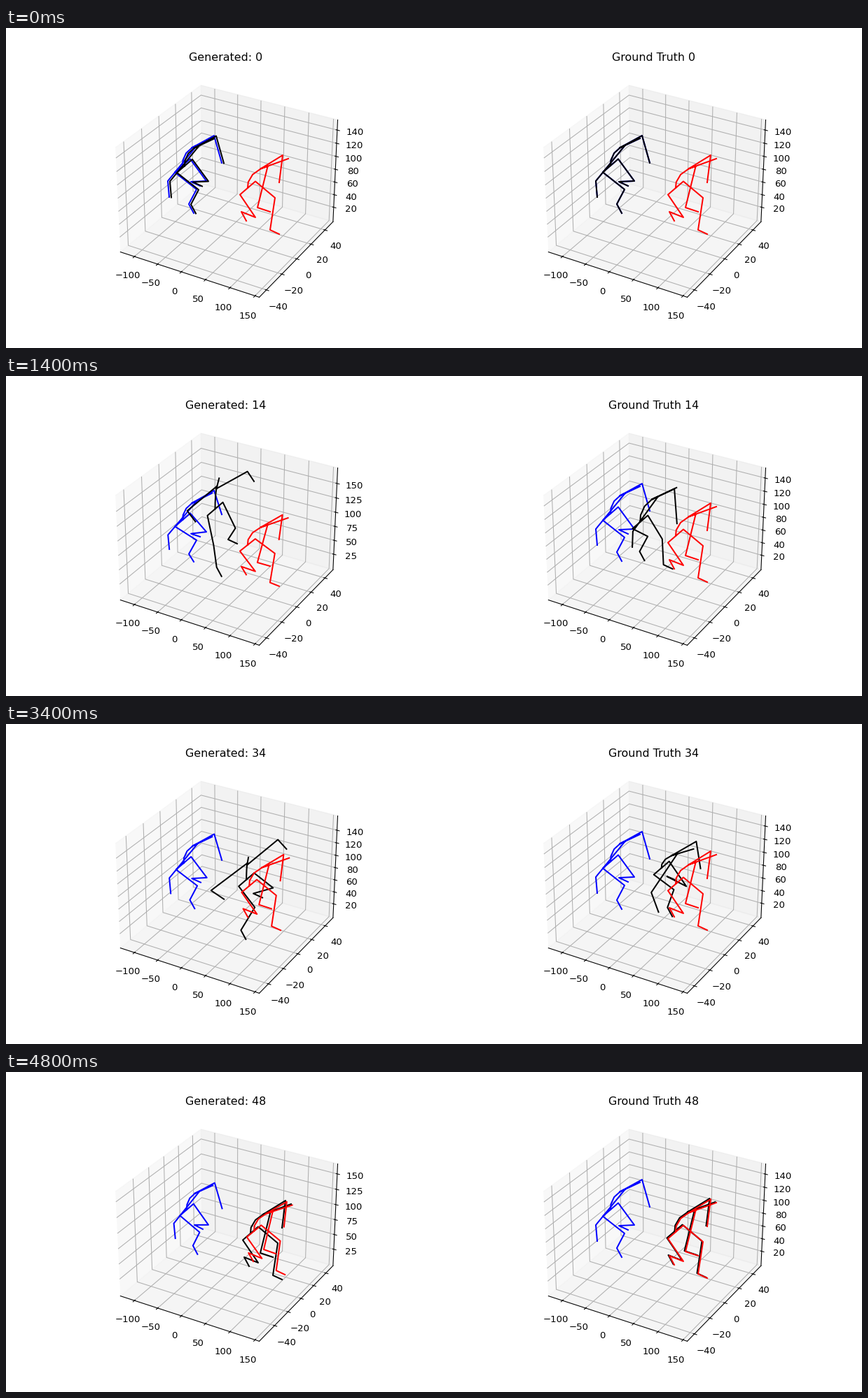
Recreate the animation shown at these times as a matplotlib script. Size 1222 px wide and 458 px high, loop 4.9 s.

```python
import numpy as np
import matplotlib.pyplot as plt
from matplotlib.animation import FuncAnimation
from matplotlib.lines import Line2D
from matplotlib.transforms import Affine2D

W, H, DPI = 1222, 458, 95.46875
FRAMES, STEP_MS = 49, 100
PANEL = W / 2

fig = plt.figure(figsize=(12.8, 4.8), dpi=DPI)
to_fig = (Affine2D().scale(1, -1).translate(0, H).scale(1 / W, 1 / (4.8 * DPI))
          + fig.transFigure)

# Camera of the 3D axes, in pixels of one panel
BOX = np.array([4, 4, 3]) / np.sqrt(41) * 1.8294640721620434 * 25 / 24
RIGHT = np.array([np.sqrt(0.75), 0.5, 0])
UP = np.array([-0.25, np.sqrt(3) / 4, np.sqrt(0.75)])
TOWARD = np.array([np.sqrt(3) / 4, -0.75, 0.5])
SCALE = 0.77 * 4.8 * DPI / 0.185
CX = PANEL * 0.5125 + 0.0025 * SCALE
CY = H - 0.495 * 4.8 * DPI - 0.0025 * SCALE

XLIM, ZMIN = (-130.5, 158.4), -3.4
REST = (-49, 52, 155.2)  # y range and top of z


def box_limits(y0, y1, z1):
    low = np.array([XLIM[0], y0, ZMIN])
    return low, np.array([XLIM[1], y1, z1]) - low


def project(points, limits):
    low, size = box_limits(*limits)
    p = ((points - low) / size - 0.5) * BOX
    depth = 10 - p @ TOWARD
    return np.column_stack([CX + SCALE * (p @ RIGHT) / depth,
                            CY - SCALE * (p @ UP) / depth])


def unproject(pixels, plane):
    """World positions of pixels, with y a linear function of the pixel."""
    low, size = box_limits(*REST)
    y = pixels @ plane[:2] + plane[2]
    box_y = ((y - low[1]) / size[1] - 0.5) * BOX[1]
    out = []
    for (px, pz), by in zip(pixels, box_y):
        a, b = (px - CX) / SCALE, (CY - pz) / SCALE
        rows = np.array([RIGHT + a * TOWARD, UP + b * TOWARD])
        x, z = np.linalg.solve(rows[:, [0, 2]],
                               10 * np.array([a, b]) - rows[:, 1] * by)
        out.append([x, by, z])
    return (np.array(out) / BOX + 0.5) * size + low


# A pose is: pelvis, head, two knees, two ankles,
# near elbow and wrist, far elbow and wrist
def pose(*points):
    return np.array(points, float)


blue = pose((252, 197), (294, 158), (272, 231), (286, 219), (261, 252),
            (264, 220), (231, 219), (233, 242), (297, 154), (308, 193))
red = pose((345, 229), (403, 187), (356, 271), (384, 243), (336, 263),
           (377, 289), (359, 257), (377, 263), (395, 182), (390, 221))

TIMES = np.array([0, 6, 19, 39, 48], float)
GENERATED = np.array([
    blue + (3, 0.5),
    pose((273, 184), (292, 136), (275, 231), (304, 207), (275, 263),
         (290, 227), (232, 190), (249, 204), (329, 136), (338, 157)),
    pose((313, 199), (316, 160), (313, 250), (342, 228), (316, 279),
         (331, 238), (278, 204), (284, 222), (351, 143), (361, 157)),
    pose((348, 228), (363, 195), (362, 266), (388, 237), (338, 291),
         (361, 253), (308, 248), (329, 258), (396, 173), (405, 192)),
    red + (4, 2)])
TRUTH = np.array([
    blue,
    pose((274, 206), (318, 162), (280, 248), (311, 220), (264, 250),
         (318, 259), (263, 230), (278, 246), (318, 161), (327, 199)),
    pose((304, 209), (360, 159), (321, 216), (332, 241), (313, 253),
         (323, 266), (292, 217), (280, 245), (356, 161), (357, 217)),
    pose((331, 210), (377, 184), (347, 249), (369, 232), (335, 264),
         (343, 224), (322, 249), (339, 272), (380, 172), (385, 207)),
    red - (1.5, 1)])

HALF_HIP = np.array([11, -9.5])
LEFT_FOOT, RIGHT_FOOT = np.array([7, 13]), np.array([13, 6])


def outline(keys):
    """Legs, bent spine and arms built around the points of a pose."""
    pelvis, head, knee_l, knee_r, ankle_l, ankle_r, *arms = keys

    def spine(f):
        return pelvis + (head - pelvis) * (f ** 2.7, f)

    chest = spine(0.66)
    shoulder = chest + (head - chest) / 4
    gap = (np.nan, np.nan)
    return np.array([
        ankle_l + LEFT_FOOT, ankle_l, knee_l, pelvis - HALF_HIP,
        pelvis + HALF_HIP, knee_r, ankle_r, ankle_r + RIGHT_FOOT, gap,
        pelvis, spine(0.2), spine(0.46), chest, head, gap,
        chest, shoulder, *arms[:2], gap,
        chest, *arms[2:]])


def smooth(keys, t):
    """Cubic Hermite curve through the key poses."""
    slopes = np.gradient(keys, TIMES, axis=0)
    i = min(np.searchsorted(TIMES, t, side="right") - 1, len(TIMES) - 2)
    h = TIMES[i + 1] - TIMES[i]
    s = (t - TIMES[i]) / h
    return ((1 + 2 * s) * (1 - s) ** 2 * keys[i] + s * (1 - s) ** 2 * h * slopes[i]
            + s * s * (3 - 2 * s) * keys[i + 1] + s * s * (s - 1) * h * slopes[i + 1])


def hump(n, start, span):
    return np.sin(np.pi * np.clip((n - start) / span, 0, 1)) ** 2


def generated_limits(n):
    y0, y1, z1 = REST
    return (y0 - 0.72 * max(0, n - 30), y1 + 5.2 * hump(n, 0, 12),
            z1 + 22.5 * hump(n, 1, 22.5) + 27 * hump(n, 30, 23))


def truth_limits(n):
    y0, y1, z1 = REST
    return y0, y1 + 2.2 * hump(n, 0, 12), z1


def ticks(low, high, step):
    pad = (high - low) / 50
    first = np.ceil((low + pad) / step) * step
    return np.arange(first, high - pad, step)


BLUE_3D = unproject(outline(blue), (0.722, -0.129, -149.5))
RED_3D = unproject(outline(red), (0.3, -0.15, -88))


class Panel:
    def __init__(self, index, label, keys, limits):
        self.label, self.keys, self.limits = label, keys, limits
        self.shift = np.array([index * PANEL, 0])
        self.ax = fig.add_axes([index / 2 + 0.0625, 0.11, 0.3875, 0.77],
                               projection="3d")
        self.ax.set_xlim(*XLIM)
        self.ax.set_xticks(np.arange(-100, 151, 50))
        self.lines = [Line2D([], [], color=c, lw=1.5, transform=to_fig)
                      for c in ("blue", "black", "red")]
        for line in self.lines:
            self.ax.add_line(line)

    def show(self, n):
        limits = y0, y1, z1 = self.limits(n)
        self.ax.set_ylim(y0, y1)
        self.ax.set_zlim(ZMIN, z1)
        self.ax.set_yticks(ticks(y0, y1, 20))
        step = 25 if z1 > 164 else 20
        self.ax.set_zticks(ticks(1, z1, step))
        self.ax.set_title(f"{self.label} {n}")
        figures = (project(BLUE_3D, limits), outline(smooth(self.keys, n)),
                   project(RED_3D, limits))
        for line, points in zip(self.lines, figures):
            line.set_data(*(points + self.shift).T)


panels = [Panel(0, "Generated:", GENERATED, generated_limits),
          Panel(1, "Ground Truth", TRUTH, truth_limits)]


def draw(n):
    for panel in panels:
        panel.show(n)
    return [line for panel in panels for line in panel.lines]


anim = FuncAnimation(fig, draw, frames=FRAMES, interval=STEP_MS, repeat=True,
                     repeat_delay=0, blit=False)
plt.show()
```
